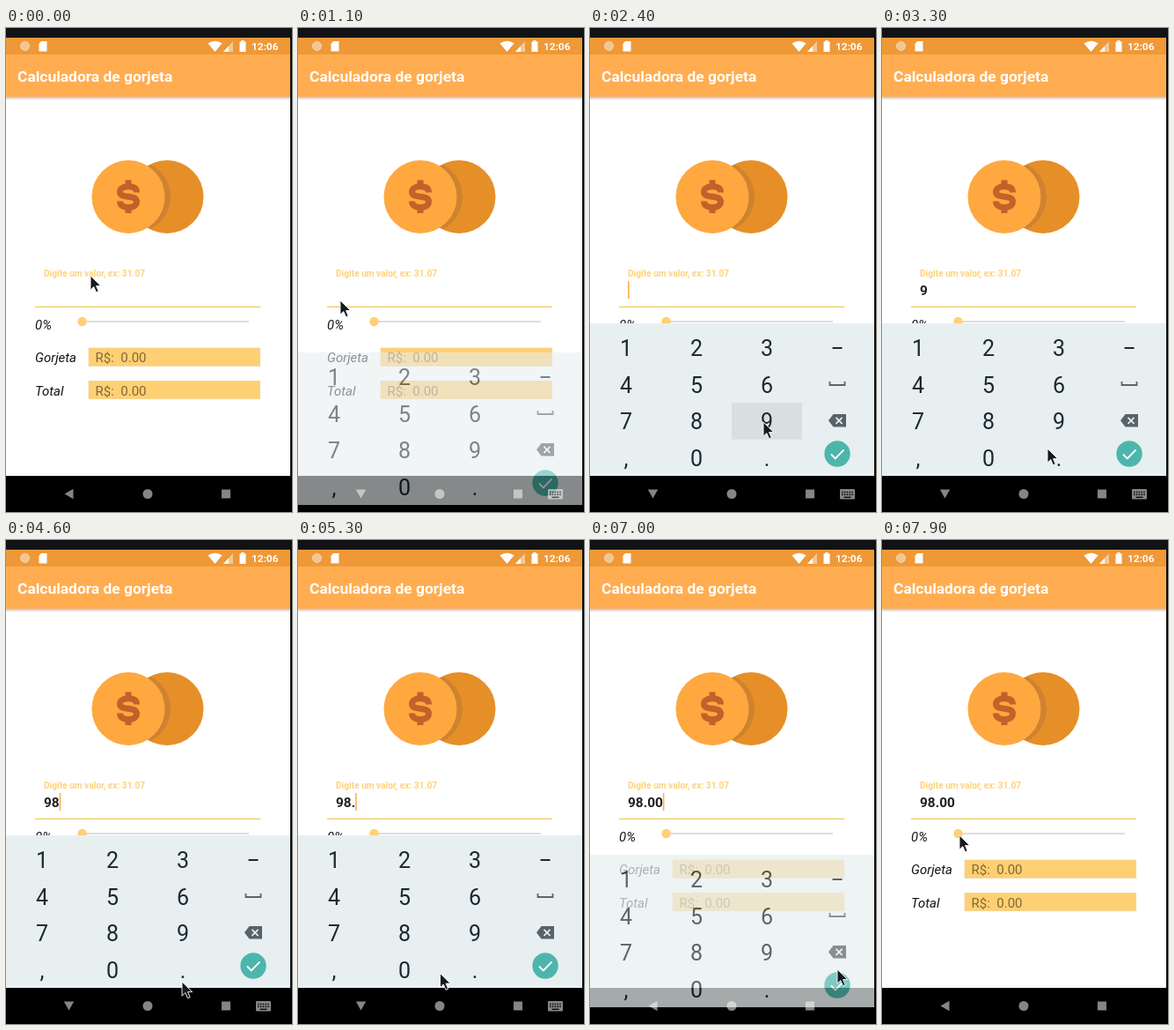
An HTML page for the animation above (8 s loop, 325 px wide and 549 px high).

```html
<!DOCTYPE html>
<html lang="pt">
<head>
<meta charset="utf-8">
<title>Calculadora de gorjeta</title>
<style>
  html, body { margin: 0; width: 100%; height: 100%; overflow: hidden; background: #0b0c0e; }
  svg { display: block; width: 325px; height: 549px; }
  text { font-family: Roboto, sans-serif; white-space: pre; }
  .label { font-size: 15px; font-style: italic; fill: #151515; }
  .amount { font-size: 15px; fill: #82683a; }
  .key { font-size: 25px; fill: #1a2a30; text-anchor: middle; }
</style>
</head>
<body>
<svg viewBox="0 0 325 549">
  <defs>
    <linearGradient id="shade" x2="0" y2="1">
      <stop stop-color="#000" stop-opacity=".24"/>
      <stop offset="1" stop-color="#000" stop-opacity="0"/>
    </linearGradient>
    <clipPath id="screen"><rect y="11" width="323" height="531"/></clipPath>
    <clipPath id="backCoin"><circle cx="183" cy="191.5" r="41.5"/></clipPath>
  </defs>
  <rect width="325" height="549" fill="#000"/>
  <rect width="325" height="11" fill="#101215"/>
  <g clip-path="url(#screen)">
    <rect y="11" width="323" height="497" fill="#fff"/>
    <rect y="78" width="323" height="4" fill="url(#shade)"/>
    <rect y="11" width="323" height="19" fill="#ee9838"/>
    <rect y="30" width="323" height="48" fill="#ffad50"/>
    <g fill="#fff">
      <circle cx="21.5" cy="20.5" r="5" fill="#f3c590" stroke="#f6d5b0"/>
      <path d="M40 15h6.5v11.5h-9v-8.5z"/>
      <path d="M229.5 17.5q8-5.5 16 0l-8 9.5z"/>
      <path d="M258 15v12h-11z" opacity=".45"/>
      <path d="M253 20.5v6.5h-6z"/>
      <path d="M267.5 14h3v1.5h2v11.5h-7v-11.5h2z"/>
      <text x="279" y="25" font-size="11.8" font-weight="700">12:06</text>
      <text x="13" y="61" font-size="17.4" font-weight="700">Calculadora de gorjeta</text>
    </g>

    <circle cx="183" cy="191.5" r="41.5" fill="#e68f28"/>
    <circle cx="145.5" cy="191.5" r="41.5" fill="#cf8230" clip-path="url(#backCoin)"/>
    <circle cx="139" cy="191.5" r="41.5" fill="#fea83f"/>
    <path d="M148.5 186.5C148.5 182 145 179.8 139 179.8S129.5 182.5 129.5 186C129.5 194.5 148.5 188 148.5 197C148.5 201 145 203.5 139 203.5S129.5 201 129.5 196.5M139 172.5v7M139 203.5v6.5"
      fill="none" stroke="#c0622a" stroke-width="7"/>

    <text x="43" y="282" font-size="10.15" font-weight="700" fill="#ffd27c">Digite um valor, ex: 31.07</text>
    <text id="value" x="43" y="303" font-size="15.4" font-weight="700" fill="#202020"></text>
    <rect id="caret" y="287" width="1.6" height="20" fill="#ffae52"/>
    <rect x="33" y="315.6" width="256" height="1.6" fill="#f4cf68"/>

    <text class="label" x="33" y="342">0%</text>
    <rect x="86" y="332.2" width="190" height="1.6" fill="#d5d5d5"/>
    <circle cx="86.5" cy="333" r="5.2" fill="#ffd073"/>
    <text class="label" x="33" y="379">Gorjeta</text>
    <text class="label" x="33" y="416.5">Total</text>
    <g fill="#ffd073" stroke="#e9cf98" stroke-width=".6">
      <rect x="94" y="363" width="194.7" height="20.5"/>
      <rect x="94" y="400.3" width="194.7" height="20.5"/>
    </g>
    <text class="amount" x="101.5" y="379">R$:  0.00</text>
    <text class="amount" x="101.5" y="416.5">R$:  0.00</text>

    <rect y="508" width="323" height="34" fill="#000"/>
    <g id="keyboard">
      <rect y="335" width="323" height="173" fill="#e8eff0"/>
      <rect id="pressed" width="80" height="41.5" fill="#d8dfe0"/>
      <g id="keys"></g>
      <path d="M275.5 363h11" stroke="#1a2a30" stroke-width="2"/>
      <path d="M272.5 401v4h17v-4" fill="none" stroke="#59666b" stroke-width="1.8"/>
      <path d="M271 445.3l5.5-7.3h14.5v14.6h-14.5z" fill="#566469"/>
      <path d="M279.5 441.8l7 7m0-7l-7 7" stroke="#e8eff0" stroke-width="1.7"/>
      <circle cx="281" cy="483" r="14.7" fill="#4db6ac"/>
      <path d="M274 483.5l4.8 4.8 9.7-10" fill="none" stroke="#fff" stroke-width="1.9"/>
    </g>
    <g fill="#fff" opacity=".52">
      <path id="back" d="M66.5 528.5l10-5.7v11.4z"/>
      <circle cx="161" cy="528.5" r="5.5"/>
      <rect x="245" y="523.5" width="10" height="10"/>
      <g id="switcher">
        <rect x="284" y="523" width="17" height="11.5" rx="1"/>
        <path d="M286 526.5h13M286 529.3h13" stroke="#000" stroke-width="1.5" stroke-dasharray="1.5 1.3"/>
        <path d="M288.5 532.3h8" stroke="#000" stroke-width="1.3"/>
      </g>
    </g>
  </g>
  <path id="pointer" d="M0 0v16.2l3.8-3.6 2.7 6.2 2.7-1.2-2.7-6h5.2z" fill="#16191d" stroke="#fff" stroke-width=".9"/>
</svg>
<script>
const LOOP = 8000, STEP = 100, BLINK = 500, GLIDE = 400;
const FOCUS = 300, OPEN = 900, CLOSE = 6900, SLIDE = 350;
const KEYS = '123456789,0.';
const $ = id => document.getElementById(id);
const clamp = n => Math.min(1, Math.max(0, n));
const ease = n => n * n * (3 - 2 * n);
const show = (id, on) => $(id).setAttribute('visibility', on ? 'visible' : 'hidden');
const move = (id, x, y) => $(id).setAttribute('transform', `translate(${x} ${y})`);

const typed = [
  { at: 2500, key: '9' }, { at: 4200, key: '8' }, { at: 5200, key: '.' },
  { at: 5700, key: '0' }, { at: 6200, key: '0' }
];
// the pointer rests, then glides to each stop
const home = { x: 96, y: 281 };
const stops = [
  { at: 50, x: 48, y: 309 }, { at: 1350, x: 207, y: 390 }, { at: 1900, x: 197, y: 447 },
  { at: 2900, x: 188, y: 477 }, { at: 3500, x: 116, y: 453 }, { at: 4200, x: 200, y: 501 },
  { at: 5100, x: 123, y: 482 }, { at: 6300, x: 281, y: 487 }, { at: 7100, x: 88, y: 335 }
];

function keyCell(key) {
  const i = KEYS.indexOf(key);
  return { x: 1 + i % 3 * 80, y: 342 + Math.floor(i / 3) * 41.6 };
}

function pointerAt(t) {
  return stops.reduce((from, to) => {
    const k = ease(clamp((t - to.at) / GLIDE));
    return { x: from.x + (to.x - from.x) * k, y: from.y + (to.y - from.y) * k };
  }, home);
}

function caretVisible(t) {
  const resets = [FOCUS, ...typed.map(entry => entry.at), CLOSE + STEP];
  const last = resets.filter(at => at <= t).pop();
  return last !== undefined && Math.floor((t - last) / BLINK) % 2 === 0;
}

$('keys').innerHTML = [...KEYS].map(key => {
  const { x, y } = keyCell(key);
  return `<text class="key" x="${x + 40}" y="${y + 30}">${key}</text>`;
}).join('');

function render(t) {
  const pointer = pointerAt(t);
  move('pointer', pointer.x, pointer.y);

  const shown = clamp((t - OPEN) / SLIDE) - clamp((t - CLOSE) / SLIDE);
  move('keyboard', 0, 77 * (1 - shown));
  $('keyboard').setAttribute('opacity', shown);

  const open = t > OPEN && t <= CLOSE;
  $('back').setAttribute('transform', open ? 'rotate(-90 71.5 528.5)' : '');
  show('switcher', open);

  $('value').textContent = typed.filter(({ at }) => at <= t).map(({ key }) => key).join('');
  const width = $('value').textContent ? $('value').getComputedTextLength() : 0;
  $('caret').setAttribute('x', 43 + width);
  show('caret', caretVisible(t));

  const press = typed.find(({ at }) => t >= at - STEP && t < at + STEP);
  show('pressed', press);
  if (press) {
    const { x, y } = keyCell(press.key);
    move('pressed', x, y);
  }
}

const start = performance.now();
function tick() {
  const t = (performance.now() - start) % LOOP;
  render(Math.floor(t / STEP) * STEP);
  requestAnimationFrame(tick);
}
tick();
</script>
</body>
</html>
```
